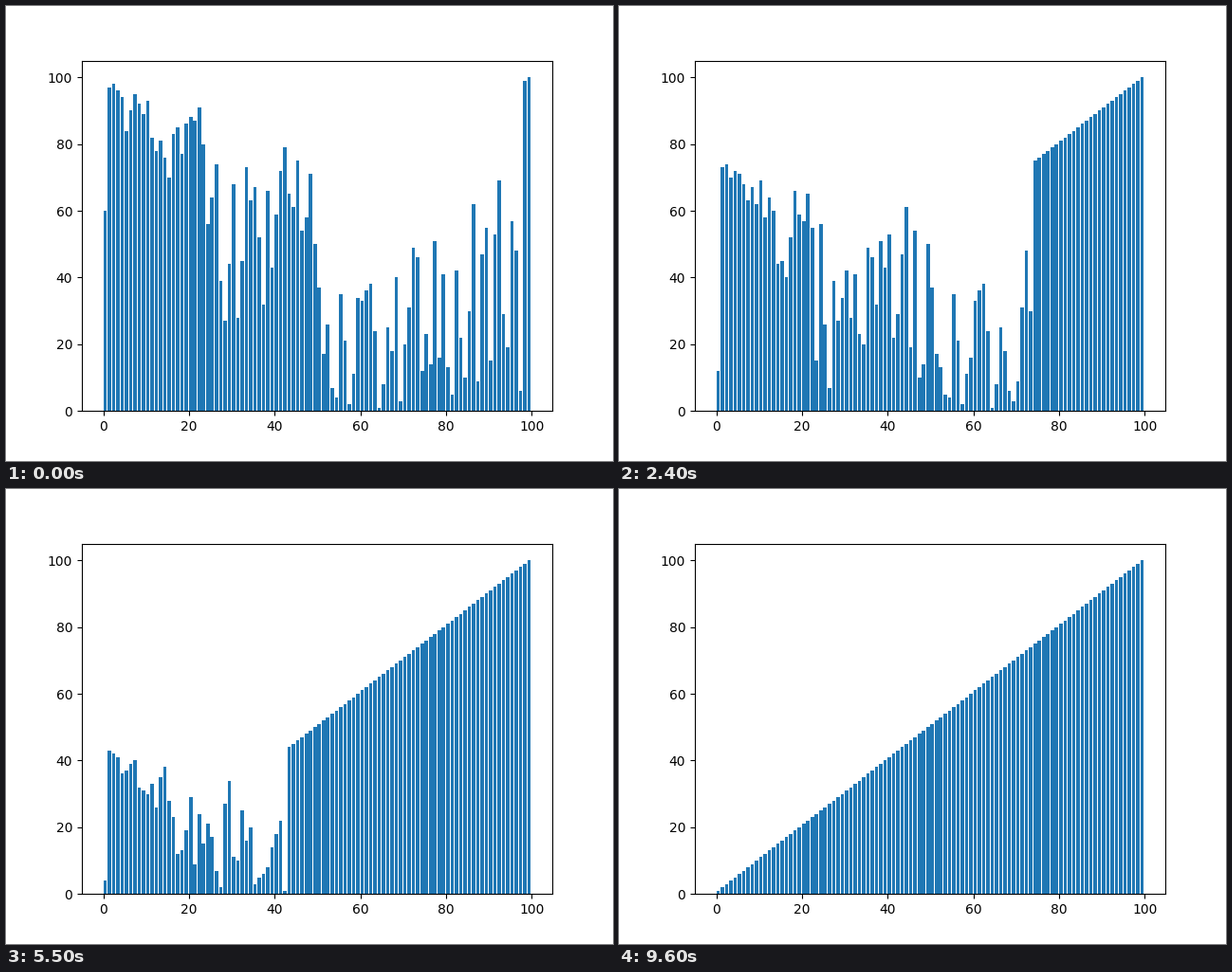
Animation, 640 px wide and 480 px high, one loop 9800 ms. Source, as a matplotlib script:

```python
import matplotlib.pyplot as plt
from matplotlib.animation import FuncAnimation

FRAMES = 98
INTERVAL = 100

# Heap with its two largest values already moved to the end.
START = [
    60, 97, 98, 96, 94, 84, 90, 95, 92, 89,
    93, 82, 78, 81, 76, 70, 83, 85, 77, 86,
    88, 87, 91, 80, 56, 64, 74, 39, 27, 44,
    68, 28, 45, 73, 63, 67, 52, 32, 66, 43,
    59, 72, 79, 65, 61, 75, 54, 58, 71, 50,
    37, 17, 26, 7, 4, 35, 21, 2, 11, 34,
    33, 36, 38, 24, 1, 8, 25, 18, 40, 3,
    20, 31, 49, 46, 12, 23, 14, 51, 16, 41,
    13, 5, 42, 22, 10, 30, 62, 9, 47, 55,
    15, 53, 69, 29, 19, 57, 48, 6, 99, 100,
]


def sift_down(values, size):
    """Restore the max-heap in values[:size] after its root was replaced."""
    root = 0
    while 2 * root + 1 < size:
        child = 2 * root + 1
        if child + 1 < size and values[child + 1] > values[child]:
            child += 1
        if values[root] >= values[child]:
            break
        values[root], values[child] = values[child], values[root]
        root = child


def heap_sort_states(values):
    """List the array right after each root extraction."""
    values = list(values)
    states = [values[:]]
    for end in range(len(values) - 3, 0, -1):
        sift_down(values, end + 1)
        values[0], values[end] = values[end], values[0]
        states.append(values[:])
    return states


states = heap_sort_states(START)

fig, ax = plt.subplots(figsize=(6.4, 4.8), dpi=100)
bars = ax.bar(range(len(START)), START, align="edge")
ax.set_xlim(ax.get_xlim())
ax.set_ylim(0, 105)


def draw(frame):
    for bar, height in zip(bars, states[frame]):
        bar.set_height(height)
    return bars.patches


anim = FuncAnimation(fig, draw, frames=FRAMES, interval=INTERVAL,
                     repeat=True, repeat_delay=0)
plt.show()
```
